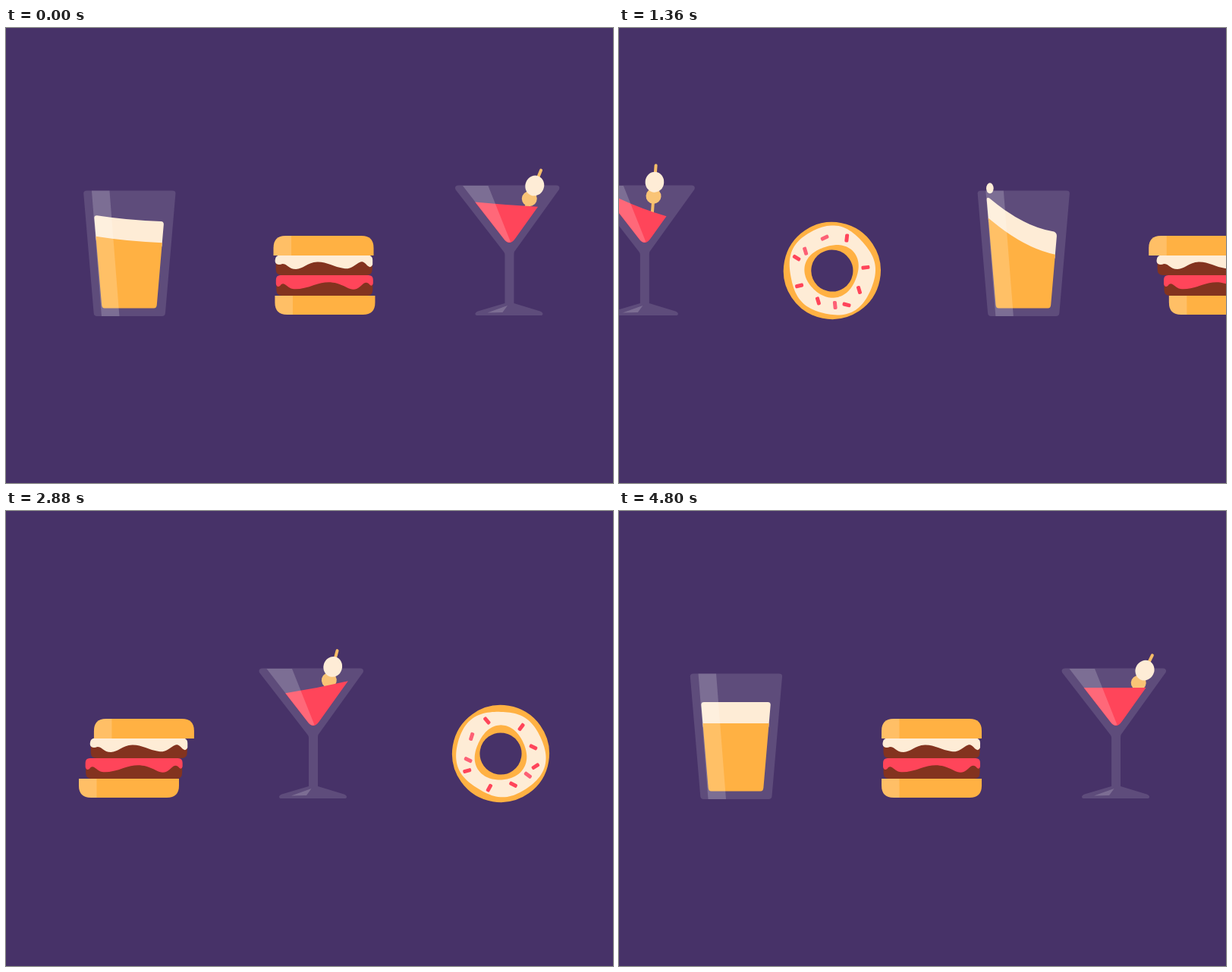
Recreate the animation shown at these times as an HTML page. Size 800 by 600 pixels, loop 4.84 s.

```html
<!DOCTYPE html>
<html lang="en">
<head>
<meta charset="utf-8">
<title>Snack carousel</title>
<style>
html, body { margin: 0; width: 100%; height: 100%; overflow: hidden; background: #473268; }
svg { display: block; width: 100vw; height: 100vh; }
.glass { fill: #fff; fill-opacity: .125; }
.shine { fill: #fff; fill-opacity: .19; }
.bun { fill: #ffb143; }
.meat { fill: #83331f; }
.cream { fill: #feecd6; }
.red { fill: #ff455a; }
</style>
</head>
<body>
<svg viewBox="0 0 800 600">
  <rect width="800" height="600" fill="#473268"/>

  <g id="beer">
    <path class="glass" d="M98 214.5H211Q215.300 214.500 215 218.500L201.500 376Q201.200 380 197 380H111.500Q107.500 380 107.200 376L93.800 218.500Q93.500 214.500 98 214.500Z"/>
    <path id="foam" class="cream"/>
    <path id="ale" class="bun"/>
    <ellipse id="drop" class="cream" rx="4.8" ry="7"/>
    <path class="shine" d="M104.500 214.500H128L141 380H117.500Z"/>
  </g>

  <g id="burger">
    <g class="layer">
      <path class="bun" d="M346 353H478V362Q478 378 462 378H362Q346 378 346 362Z"/>
      <path class="shine" d="M346 353H369.500V378H362Q346 378 346 362Z"/>
    </g>
    <g class="layer">
      <path class="meat" d="M348.500 332H475.500V345Q475.500 353 468 353H356Q348.500 353 348.500 345Z"/>
      <path class="red" d="M354 326H470Q476 326 476 332V337Q475 341 472 339C468 334 465 335 460 340C453 346 449 346 441 342C424 333 413 334 398 339C388 343 377 345 370 344C363 343 360 335 355 338C352 343 348 341 348 337V332Q348 326 354 326Z"/>
    </g>
    <g class="layer">
      <path class="meat" d="M348.500 306H475.500V318Q475.500 326 468 326H356Q348.500 326 348.500 318Z"/>
      <path class="cream" d="M354 299.500H470Q476 300 476 306V312Q474 317 470 314C465 309 463 306 457 310C448 316 446 318 438 317C425 315 415 308 403 308.500C390 309 384 318 375 318C365 318 364 311 357 311C353 313 348 312 347.500 308V306Q348 299.500 354 299.500Z"/>
    </g>
    <g class="layer">
      <path class="bun" d="M346 300V290Q346 274 362 274H462Q478 274 478 290V300Z"/>
      <path class="shine" d="M346 300V290Q346 274 362 274H369.500V300Z"/>
    </g>
  </g>

  <g id="martini">
    <path class="glass" d="M588 207.500H717Q721 207.500 721 211Q721 213 719 215L661.500 295Q661 297 661 299V363L695.500 373.500Q699 375 699 377Q699 379 696 379H613Q610 379 610 377Q610 375 613.500 373.500L649 363V299Q649 297 647.500 295L585.500 215Q583.500 213 583.500 211Q583.500 207.500 588 207.500Z"/>
    <g id="pick">
      <path d="M0-20V-89" stroke="#f6bd68" stroke-width="4" stroke-linecap="round"/>
      <circle cy="-48.500" r="10" fill="#f9c476"/>
      <ellipse class="cream" cy="-67" rx="12.300" ry="13.500"/>
    </g>
    <path id="drink" class="red"/>
    <path class="shine" d="M593.500 208H627L656.500 282Q652 284 648 278.500Z"/>
    <path class="shine" d="M626 375.500L652.500 366L646 375Z"/>
  </g>

  <g id="donut">
    <g id="ring">
      <circle r="45.800" fill="none" stroke="#ffb143" stroke-width="36.500"/>
      <path id="icing" class="cream" fill-rule="evenodd"/>
      <g id="sprinkles"></g>
    </g>
  </g>
</svg>
<script>
const LOOP = 4840, STEP = 250, MOVE = 390, SPIN = 336;
const starts = [-42, 1162, 2366, 3572, LOOP - 42];

// [phase in ms, value] pairs, eased between neighbours
const SWAY = [[0, 0], [325, -40], [563, 27], [790, -13], [1000, 5], [1195, 0]];
const BEER = [[0, 0], [165, 50], [560, -34], [790, 22], [985, -17], [1200, 0]];
const SAG = [[0, 0], [165, 8], [400, 4], [650, 0]];
const DRINK = [[0, 0], [165, 37], [545, -17], [780, 11], [990, -7], [1200, 0]];
const PICK = [[0, 0], [160, -24.6], [350, -3], [550, -12], [800, -1], [1000, -2.5], [1200, 0]];

const $ = id => document.getElementById(id);
const layers = document.querySelectorAll('.layer');
const ease = u => { u = Math.min(1, Math.max(0, u)); return u * u * (3 - 2 * u); };
const set = (id, name, value) => $(id).setAttribute(name, value);
const path = (id, parts) => set(id, 'd', parts.map(p => typeof p === 'number' ? p.toFixed(2) : p).join(' '));

function track(keys, t) {
  for (let i = 1; i < keys.length; i++) {
    const [t0, a] = keys[i - 1], [t1, b] = keys[i];
    if (t < t1) return a + (b - a) * ease((t - t0) / (t1 - t0));
  }
  return keys[keys.length - 1][1];
}

function buildDonut() {
  const outer = a => 57.6 + 1.8 * Math.cos(2 * (a - 4.89)) + 1.1 * Math.cos(5 * a + 1);
  const inner = a => 35 + 1.6 * Math.cos(3 * a - 2.6) + 1.1 * Math.cos(2 * a);
  const loop = radius => {
    let d = '';
    for (let i = 0; i < 120; i++) {
      const a = i * Math.PI / 60, r = radius(a);
      d += (i ? 'L' : 'M') + (r * Math.cos(a)).toFixed(2) + ' ' + (r * Math.sin(a)).toFixed(2);
    }
    return d + 'Z';
  };
  set('icing', 'd', loop(outer) + loop(inner));
  const bits = [[-39, -21, 27], [-15.5, -41, 107], [9, -48, 48], [22, -40, 118, 1], [37.5, -23, 107],
    [47, 7.5, 20], [29.5, 40, 65], [15, 41, 107, 1], [-16, 41.5, 8, 1], [-40, 25, 130]];
  $('sprinkles').innerHTML = bits.map(([x, y, turn, pale]) =>
    `<rect x="-5.500" y="-2.500" width="11" height="5" rx="1.700" fill="${pale ? '#fd6075' : '#ff455a'}" transform="translate(${x} ${y}) rotate(${turn})"/>`).join('');
}

function drawBeer(t) {
  const tilt = track(BEER, t), sag = track(SAG, t);
  const mid = 252 - sag * .7, l = mid - tilt / 2, r = mid + tilt / 2;
  const left = y => 108 + (y - 252) * .0855, right = y => 200 - (y - 252) * .0855;
  const bend = mid + 2 * sag, slope = tilt / 92 * 4;
  path('foam', ['M', left(l + 33), l + 33, 'L', left(l + 4), l + 4, 'Q', left(l), l, left(l) + 4, l + slope,
    'Q', 154, bend, right(r) - 4, r - slope, 'Q', right(r), r, right(r + 4), r + 4,
    'L', right(r + 33), r + 33, 'Q', 154, bend + 33, left(l + 33), l + 33, 'Z']);
  const low = 28;
  path('ale', ['M', left(l + low), l + low, 'Q', 154, bend + low, right(r + low), r + low,
    'L', right(365), 365, 'Q', right(369.5), 369.5, 186.5, 369.5, 'H', 121.5,
    'Q', left(369.5), 369.5, left(365), 365, 'Z']);

  const y = t < 154 ? 217 + (154 - t) * .35 : 209.5 + .00072 * (t - 250) ** 2;
  set('drop', 'cx', 110 + 2.5 * Math.max(0, t - 347) / 131);
  set('drop', 'cy', y);
  set('drop', 'visibility', t > 100 && t < 560 ? 'visible' : 'hidden');
}

function drawMartini(t) {
  const tilt = track(DRINK, t), sag = track(SAG, t) * .35;
  const mid = 233 - sag, l = mid - tilt / 2, r = mid + tilt / 2;
  const left = y => 612.5 + (y - 233) * .777, right = y => 694.5 - (y - 233) * .713;
  path('drink', ['M', left(l), l, 'Q', (left(l) + right(r)) / 2, mid + 2 * sag, right(r), r,
    'L', right(277), 277, 'Q', 655, 289, left(277), 277, 'Z']);
  set('pick', 'transform', `translate(663 270) rotate(${26.6 + track(PICK, t)})`);
}

function render(time) {
  let k = 4;
  while (starts[k] > time) k--;
  const t = time - starts[k], moved = k + ease(t / MOVE);
  const slot = home => (home + moved + 1) % 4 - 1;
  const place = (id, home, x = 0, y = 0) =>
    set(id, 'transform', `translate(${(slot(home) * STEP + x).toFixed(2)} ${y})`);

  place('beer', 0);
  place('burger', 1, -STEP);
  place('martini', 2, -2 * STEP);
  place('donut', -1, 152, 320);

  const sway = track(SWAY, t);
  layers.forEach((layer, i) => layer.setAttribute('transform', `translate(${(sway * i / 3).toFixed(2)} 0)`));
  drawBeer(t);
  drawMartini(t);
  const turns = k % 4 - 1 + ease(t / SPIN);
  set('ring', 'transform', `rotate(${(turns * 229.7).toFixed(2)})`);
}

buildDonut();
const begin = performance.now();
function tick() {
  render((performance.now() - begin) % LOOP);
  requestAnimationFrame(tick);
}
tick();
</script>
</body>
</html>
```
